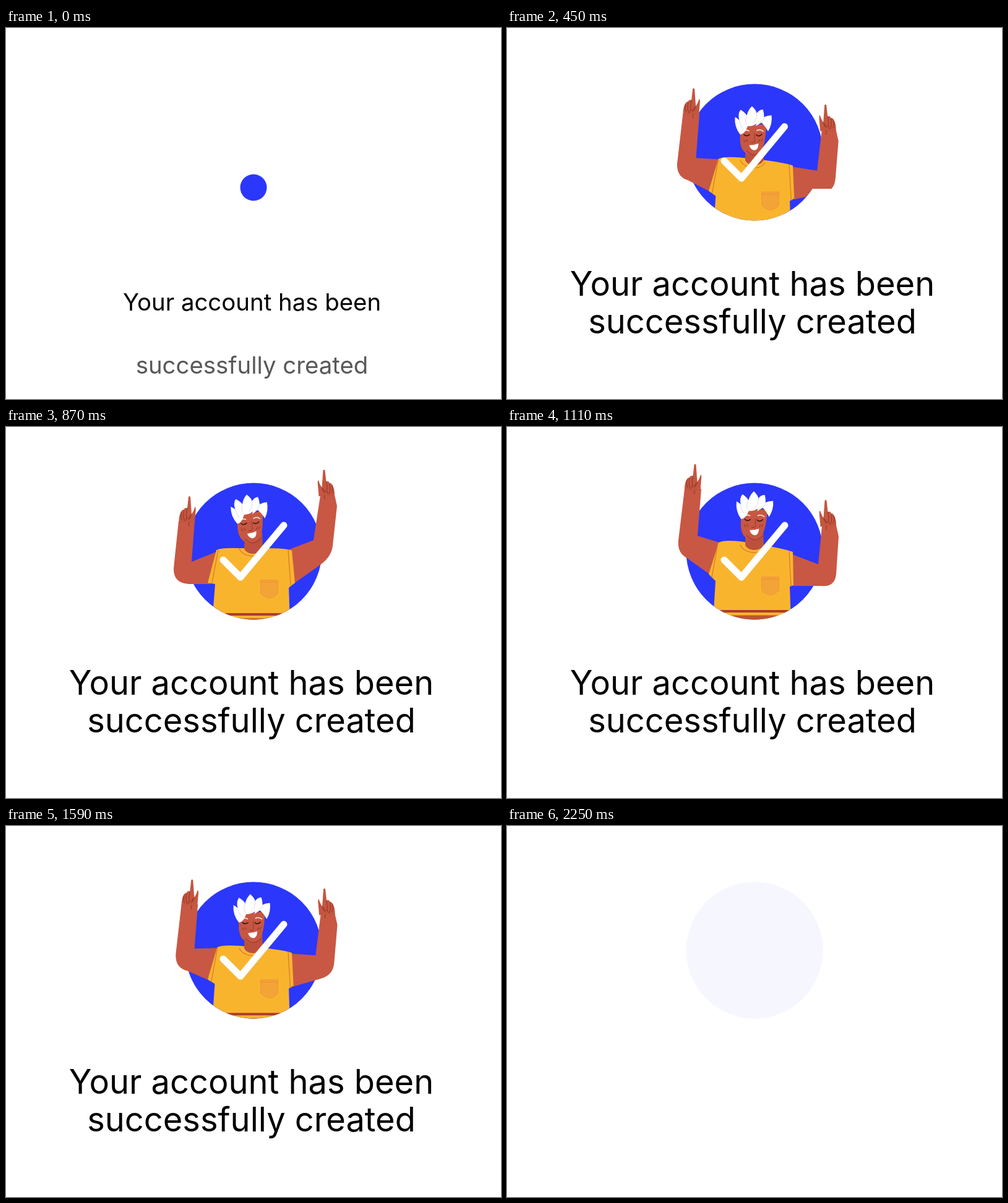
Write an HTML page that moves like this. It is 800 px wide and 600 px high and loops after 2580 ms.

```html
<!DOCTYPE html>
<html lang="en">
<head>
<meta charset="utf-8">
<title>Account created</title>
<style>
html, body { margin: 0; width: 100%; height: 100%; overflow: hidden; background: #fff; }
svg { display: block; width: 800px; height: 600px; }
text { font: 400 54.2px Inter, "Open Sans", sans-serif; text-anchor: middle; }
.line { fill: none; stroke-linecap: round; stroke-linejoin: round; }
</style>
</head>
<body>
<svg viewBox="0 0 800 600">
  <defs>
    <clipPath id="mask"><path d="M0,0H800V260H493.4A110.5 110.5 0 0 1 306.6 260H0Z"/></clipPath>
    <clipPath id="shirtClip"><path id="shirtShape"/></clipPath>
    <g id="hand">
      <path fill="#c45640" d="M-1.5,1Q0,-1 1.5,1L3.5,29Q7,24 9,17Q11,18 9.8,27L8.5,43H-17L-17,37Q-16,28 -13,24Q-11,21 -9,22Q-8,18 -3.5,19Z"/>
      <path class="line" stroke="#8a3022" stroke-width=".9" d="M-13,26Q-15,34 -12,38M-9,23Q-11,33 -8,39Q-5,40 -5,35M-3.5,20Q-6,30 -4,35Q0,38 1,31M3.5,29Q2,35 -1,38M-1,48V42"/>
    </g>
  </defs>
  <circle id="disc" cx="400" fill="#2c37fc"/>
  <g clip-path="url(#mask)">
    <g id="person">
      <path id="armL" fill="#c85843"/>
      <path id="armR" fill="#c85843"/>
      <use id="handL" href="#hand"/>
      <use id="handR" href="#hand"/>
      <path id="shirt" fill="#f9b42e"/>
      <g clip-path="url(#shirtClip)">
        <g id="trim">
          <path fill="#ae3a30" d="M320,299H480V303H320Z"/>
          <path fill="#bf5535" d="M320,307.5H480V330H320Z"/>
          <path fill="#f3a436" stroke="#ef963a" d="M411.5,245.5H439.5V267Q436,272 426,275Q415,272 411.5,267Z"/>
          <path class="line" stroke="#ef8a3d" d="M412,249H439"/>
        </g>
      </g>
      <path id="seams" class="line" stroke="#d9762c" stroke-width="1.2"/>
      <g id="neck">
        <path fill="#bd503b" d="M386,168H414L415,195Q410,203 399,203Q388,202 385,195Z"/>
        <path class="line" stroke="#d9762c" stroke-width="1.2" d="M377,195Q383,207 402,207Q411,207 417,199"/>
      </g>
      <g id="head">
        <path fill="#c65742" d="M376,138V160Q377,184 397,185Q406,185 411,179L415,166Q418,152 418,134Z"/>
        <path class="line" stroke="#93382a" d="M387,178Q399,191 413,177M399,150L400,162Q398,166 394,164"/>
        <path class="line" stroke="#3a1515" stroke-width="1.6" d="M382,152Q386,156 391,152M402,152Q406,156 411,151"/>
        <path class="line" stroke="#f1dcd2" stroke-width="1.8" d="M380,148Q385,143 390,146M403,145Q408,142 413,146"/>
        <path class="line" stroke="#8f3024" d="M382,161l2,3M386,160l2,3M408,160l-2,3M412,159l-2,3"/>
        <path fill="#fff" d="M391,169Q399,169 406,166Q406,177 399,177Q393,176 391,169Z"/>
        <path fill="#fff" d="M376,152Q366,140 367,124Q372,126 374,129Q371,118 376,112Q384,117 386,121Q388,112 394,106Q401,112 402,117Q406,111 412,111Q414,117 414,123Q420,120 426,120Q428,134 421,146Q416,137 410,132L401,138L402,134Q395,139 388,138Q383,152 376,152Z"/>
        <path class="line" stroke="#d5d3d8" stroke-width=".8" d="M374,129Q376,139 381,143M386,121Q382,131 386,135M402,117Q403,128 396,133M414,123Q413,130 407,132"/>
      </g>
    </g>
  </g>
  <path id="check" class="line" pathLength="1" stroke="#fff" stroke-width="11" d="M351,215L379,243L449,159"/>
  <text id="line1">Your account has been</text>
  <text id="line2">successfully created</text>
</svg>
<script>
const LOOP = 2580, STEP = 30;
const el = Object.fromEntries([...document.querySelectorAll('[id]')].map(e => [e.id, e]));
const set = (id, attrs) => { for (const k in attrs) el[id].setAttribute(k, attrs[k]); };
const ramp = (t, a, b) => Math.min(1, Math.max(0, (t - a) / (b - a)));
const out = (t, a, b) => 1 - (1 - ramp(t, a, b)) ** 3;

// Blend two path strings that share the same structure.
const NUM = /-?[\d.]+/g;
function mix(a, b, p) {
  const n = b.match(NUM);
  let i = 0;
  return a.replace(NUM, v => (+v + (n[i++] - v) * p).toFixed(2));
}

// Smooth monotone curve through [time, value] points.
function curve(pts) {
  const rate = pts.slice(1).map((q, i) => (q[1] - pts[i][1]) / (q[0] - pts[i][0]));
  const slope = pts.map((_, i) => {
    const a = rate[i - 1], b = rate[i];
    return a * b > 0 ? 2 * a * b / (a + b) : 0;
  });
  return t => {
    const last = pts.length - 1;
    if (t <= pts[0][0]) return pts[0][1];
    if (t >= pts[last][0]) return pts[last][1];
    const i = pts.findIndex(q => q[0] > t) - 1;
    const [t0, a] = pts[i], [t1, b] = pts[i + 1];
    const h = t1 - t0, u = (t - t0) / h, s = u * u * (3 - 2 * u);
    return a + (b - a) * s + h * u * (1 - u) * (slope[i] * (1 - u) - slope[i + 1] * u);
  };
}

const radius = curve([[0, 21.5], [110, 85], [225, 119.5], [330, 113], [420, 110.5]]);
const sway = curve([[240, 1.1], [480, .6], [630, 0], [750, -.3], [1110, 1], [1220, 1.1], [1590, .57], [1820, -.15], [2010, .27], [2220, .9]]);
const bob = curve([[480, 4], [630, 0], [750, -1], [930, 3], [1110, 0], [1220, -1], [1590, 5], [1820, -1], [2010, 1]]);

const SHAPES = {
  armL: ['M305,150L300,216L342,199L330,252L296,252Q270,251 271,226L279,150Z',
         'M314,100L308,176L344,187L330,240L291,212Q275,204 277,183L287,100Z'],
  armR: ['M508,109L497,181L458,196L464,252L505,223Q526,209 528,190L535,126L531,108Z',
         'M509,160L503,222L458,205L463,257L508,257Q530,259 532,238L536,177L532,159Z'],
  shirt: ['M340,197Q348,193 378,194L417,194Q455,194 462,198L467,250L457,258L459,315L333,315L338,252L326,250Z',
          'M342,187Q350,182 377,185L416,191Q455,199 462,202L463,256L457,258L459,315L333,315L337,249L326,238Z'],
  seams: ['M343,197L333,250M456,197L460,254', 'M341,187L331,243M456,201L459,257']
};

function draw(t) {
  const p = sway(t);
  set('disc', {
    r: radius(t), cy: 258 - 57 * out(t, 0, 310),
    opacity: 1 - ramp(t, 2160, 2254)
  });

  for (const id in SHAPES) set(id, { d: mix(...SHAPES[id], p) });
  set('shirtShape', { d: mix(...SHAPES.shirt, p) });
  set('handL', { transform: `translate(${296.5 + 7.5 * p} ${110 - 50 * p})` });
  set('handR', { transform: `translate(${514 + p} ${67 + 51 * p}) scale(-1 1)` });
  set('trim', { transform: `translate(0 ${-3 * p})` });
  set('neck', { transform: `translate(0 ${-4 * p})` });
  set('head', { transform: `translate(0 ${1 - 3 * p}) rotate(${7 * p - 3.5} 398 188)` });
  const drop = 245 * (1 - out(t, 240, 600)) + 260 * ramp(t, 2010, 2160) ** 2;
  set('person', {
    transform: `translate(0 ${bob(t) + drop})`,
    visibility: t > 240 && t < 2160 ? 'visible' : 'hidden'
  });

  const from = ramp(t, 1950, 2172), len = out(t, 210, 500) - from;
  set('check', {
    'stroke-dasharray': `${len} 2`, 'stroke-dashoffset': -from,
    visibility: len > .03 ? 'visible' : 'hidden'
  });

  const size = 1 - .292 * (1 - out(t, 0, 320));
  const rise = 1 - out(t, 0, 240);
  const place = (y, lift) => `translate(${396.5 + rise} ${y + lift * rise}) scale(${size})`;
  set('line1', { transform: place(433, 24), opacity: 1 - ramp(t, 1910, 2150) });
  set('line2', { transform: place(494, 65), opacity: Math.min(.65 + t / 250, 1 - ramp(t, 1840, 2076)) });
}

// Every sixth step holds the previous picture; the last one stays to the end.
function snap(t) {
  const n = Math.floor(t / STEP);
  return Math.min(2250, (n % 6 === 4 ? n - 1 : n) * STEP);
}

const start = performance.now();
function tick() {
  draw(snap((performance.now() - start) % LOOP));
  requestAnimationFrame(tick);
}
tick();
</script>
</body>
</html>
```
